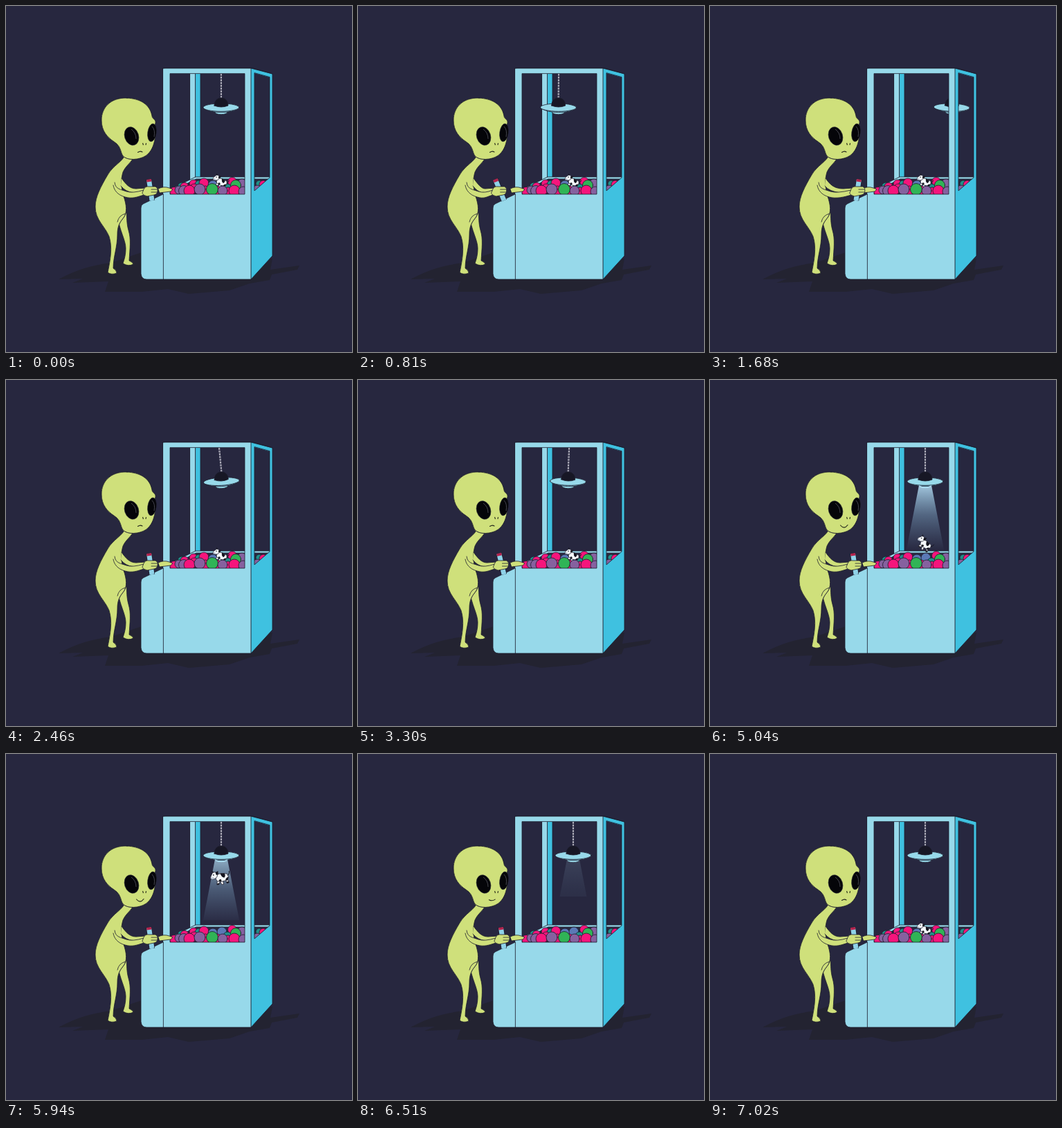
Animation, 500 px wide and 500 px high, one loop 7050 ms. Source, as an HTML page:

```html
<!DOCTYPE html>
<html lang="en">
<head>
<meta charset="utf-8">
<title>Alien claw machine</title>
<style>
html, body { margin: 0; width: 100%; height: 100%; overflow: hidden; background: #27273f; }
svg { display: block; width: 100vw; height: 100vh; }
.ln { stroke: #1c1c2c; stroke-width: .8; stroke-linejoin: round; stroke-linecap: round; }
.skin { fill: #cfe07b; }
.shade { fill: #b5c960; }
.light { fill: #97d9ea; }
.deep { fill: #3fc1e0; }
.none { fill: none; }
</style>
</head>
<body>
<svg viewBox="0 0 500 500">
  <defs>
    <linearGradient id="beamFill" gradientUnits="userSpaceOnUse" x1="0" y1="152" x2="0" y2="248">
      <stop offset="0" stop-color="#b9e4fb" stop-opacity=".85"/>
      <stop offset=".45" stop-color="#8ebcdc" stop-opacity=".42"/>
      <stop offset="1" stop-color="#7ba6ca" stop-opacity="0"/>
    </linearGradient>
    <clipPath id="headClip"><use href="#headShape"/></clipPath>
    <clipPath id="bodyClip"><use href="#bodyShape"/></clipPath>
    <clipPath id="pit"><path d="M237 240H382V249L357 272H237Z"/></clipPath>
  </defs>
  <rect width="500" height="500" fill="#27273f"/>

  <path fill="#232331" d="M76 395Q110 376 152 371L196 356V362L385 365L382 381L424 375L421 381L384 388L381 396L352 401L323 411L264 416L234 409L196 413L143 413L148 398L96 400L111 394Z"/>

  <!-- back of the cabinet -->
  <path class="light ln" d="M266 97H274V248L266 252Z"/>
  <path class="deep ln" d="M274 97H281V248H274Z"/>
  <path class="light ln" d="M237 265L274 247H382V250H275L237 269Z"/>
  <path fill="#29283f" d="M237 269L275 250H382L357 272H237Z"/>
  <g clip-path="url(#pit)">
    <g id="backBalls" class="ln"></g>
    <g id="restCow"></g>
    <g id="frontBalls" class="ln"></g>
  </g>

  <g id="ufo">
    <path id="chain" class="none" stroke="#d4d3dc" stroke-width="2.1" stroke-dasharray="2.8 1.2"/>
    <path id="chainCore" class="none" stroke="#56566b" stroke-width=".6"/>
    <g id="saucer">
      <ellipse class="light ln" cy="6.5" rx="9" ry="3.2"/>
      <path class="ln" fill="#79c3dc" d="M-26 0C-17 9 17 9 26 0Z"/>
      <ellipse class="light ln" cy="-.4" rx="26" ry="5.7"/>
      <path class="ln" fill="#171725" d="M-10 -3C-10 -18 10 -18 10 -3Q0 1 -10 -3Z"/>
    </g>
  </g>
  <path id="beam" fill="url(#beamFill)"/>
  <g id="cow">
    <path class="ln" fill="#fff" d="M-5 4L-6 10H-3L-1 5L1 10H4L3 4L7 3L9 9L12 8L10 2Z"/>
    <path class="ln" fill="#f4f8fb" d="M-6 -5Q1 -7 10 -5Q13 -1 10 4Q2 7 -5 5Q-9 0 -6 -5Z"/>
    <path fill="#15151f" d="M0 -6Q2 1 6 0Q8 -3 6 -6ZM7 4Q8 0 12 0L10 5ZM-3 5Q-2 1 1 3L1 6ZM8 7L9 9L12 8L11 6ZM-6 10L-5 8H-2L-3 10Z"/>
    <path class="none" stroke="#15151f" stroke-width="1" d="M11 -3Q14 -5 13 -9"/>
    <path class="ln" fill="#f4f8fb" d="M-11 -8Q-7 -10 -4 -6Q-4 -1 -8 1L-13 2Q-16 0 -14 -3Z"/>
    <path fill="#15151f" d="M-7 -8L-3 -10L-3 -5L-6 -4ZM-11 -8L-13 -11L-9 -9Z"/>
    <circle cx="-10" cy="-4.5" r=".9" fill="#15151f"/>
    <path fill="#b7c3d4" d="M-14 -1L-10 -1L-9 1L-13 2Z"/>
  </g>

  <!-- cabinet shell -->
  <path class="deep ln" fill-rule="evenodd" d="M354 90L385 98V361L354 395ZM359 97V267L381 248V103Z"/>
  <path class="light ln" fill-rule="evenodd" d="M227 90H354V395H227ZM237 98V272H345V98Z"/>
  <path class="light ln" d="M227 272L198 286Q195 288 195 292V387Q196 395 203 395H227Z"/>
  <path class="none ln" d="M227 90L230 89.5L356 89.5L385 98"/>

  <!-- alien -->
  <path class="skin ln" d="M161 303C164 325 173 338 173 350C173 360 171 366 169 372Q177 377 184 373Q183 370 178 368C179 350 181 337 177 324C174 313 175 305 174 298Z"/>
  <path class="skin ln" id="bodyShape" d="M172 215C169 225 155 230 147 244C137 261 129 276 129 290C129 309 143 318 149 333C154 349 151 366 147 385Q152 389 160 386Q160 382 155 379C155 362 161 349 161 330C161 319 164 313 169 307C176 299 174 287 170 275C166 262 166 250 169 240C173 231 179 228 183 221Z"/>
  <g clip-path="url(#bodyClip)">
    <path class="shade" d="M172 216L120 250V320L150 345L148 376L153 378Q158 345 151 327C135 309 138 288 149 268C158 250 154 235 174 220Z"/>
  </g>
  <use href="#bodyShape" style="fill:none"/>
  <path class="none ln" d="M161 312Q163 302 173 300"/>
  <path class="skin ln" d="M220 264Q228 260 236 263L241 265L238 268L222 270Z"/>
  <path id="farArm" class="skin ln"/>
  <path id="stick" class="none" stroke="#1c1c2c" stroke-width="8.4"/>
  <path id="stickFill" class="none" stroke="#8fd2e8" stroke-width="7"/>
  <path id="knob" class="none" stroke="#b5234d" stroke-width="7"/>
  <path id="nearArm" class="skin ln"/>
  <g id="hand">
    <path class="skin ln" d="M199 265Q201 260 207 261L216 261Q220 263 219 267Q219 272 214 273L204 275Q199 274 197 271Z"/>
    <path class="none ln" d="M210 265H218M210 269H218"/>
  </g>

  <path class="skin ln" id="headShape" d="M175 133C151 132 138 147 138 165C138 181 147 190 156 196C169 204 164 215 172 219C181 224 198 221 205 214C212 207 214 199 216 188C217 180 214 175 216 169C217 164 211 163 211 159C208 142 194 134 175 133Z"/>
  <g clip-path="url(#headClip)">
    <path class="shade" d="M180 128L130 135V190L168 214Q171 205 162 198C146 187 146 177 152 165C158 153 169 160 175 149Q180 138 196 138Z"/>
    <path class="shade" d="M207 158Q210 164 217 164L215 170Q207 168 207 158Z"/>
  </g>
  <use href="#headShape" style="fill:none"/>
  <g fill="#050509" stroke="#1c1c2c" stroke-width=".6">
    <ellipse cx="181.500" cy="188" rx="10" ry="13.500" transform="rotate(-18 181.500 188)"/>
    <ellipse cx="211" cy="183" rx="6.200" ry="13" transform="rotate(8 211 183)"/>
  </g>
  <path class="none" stroke="#55555f" stroke-width=".8" d="M181 178Q188 183 188 192M211 174Q216 179 214 189"/>
  <path class="none" stroke="#34391f" stroke-width="1.200" d="M197.500 198L198.500 201M202.500 198L202 201"/>
  <path id="mouth" class="none" stroke="#22251c" stroke-width="1.100" stroke-linecap="round"/>
</svg>
<script>
const LOOP = 7050;
const $ = id => document.getElementById(id);
const set = (id, attrs) => { for (const k in attrs) $(id).setAttribute(k, attrs[k]); };
const clamp = v => Math.max(0, Math.min(1, v));
const span = (t, a, b) => clamp((t - a) / (b - a));
const ease = u => (1 - Math.cos(Math.PI * u)) / 2;
const mix = (a, b, u) => a + (b - a) * u;

const pink = '#f5157c', purple = '#86619f', green = '#30b456', blue = '#5b79b6', teal = '#218f89';
const balls = (id, list) => {
  $(id).innerHTML = list.map(([x, y, r, c]) =>
    `<circle cx="${x}" cy="${y}" r="${r}" fill="${c}"/>`).join('');
};
balls('backBalls', [
  [254, 261, 6, teal], [258, 261, 6, pink], [271, 257, 6, pink], [279, 258, 6, teal],
  [286, 256, 7, pink], [299, 259, 7, blue], [312, 257, 7, blue],
  [327, 254, 6.5, pink], [320, 263, 6, teal], [341, 257, 7, purple],
  [366, 257, 5, teal], [372, 258, 6, pink], [379, 256, 5, pink]
]);
balls('frontBalls', [
  [332, 259, 7.5, green], [243, 268, 6.5, pink], [250, 266, 6, purple], [257, 267, 7.5, purple],
  [272, 264, 7, pink], [265, 267, 8, pink], [288, 267, 7, pink], [280, 265, 8, purple],
  [305, 267, 7, pink], [298, 265, 8.5, green], [321, 268, 6, pink], [313, 267, 7, purple],
  [330, 267, 8, pink], [343, 268, 7, purple], [363, 265, 6, purple]
]);
const cow = $('cow');
$('restCow').append(cow);

const stops = [[0, 311], [780, 289.5], [1870, 354], [2850, 289.5], [3600, 311]];
function ufoX(t) {
  for (let i = 1; i < stops.length; i++) {
    const [a, from] = stops[i - 1], [b, to] = stops[i];
    if (t < b) return mix(from, to, ease(span(t, a, b)));
  }
  return 311;
}

function drawControls(x) {
  const off = x - 311;
  const tilt = off < 0 ? off * .37 : off * .23;
  const dx = tilt * .55;
  const tipX = 206.5 + tilt, baseX = 211;
  const at = u => `${mix(tipX, baseX, u)} ${mix(251, 281, u)}`;
  set('stick', { d: `M${at(-.02)}L${at(1)}` });
  set('stickFill', { d: `M${at(0)}L${at(1)}` });
  set('knob', { d: `M${at(-.02)}L${at(.1)}` });
  set('hand', { transform: `translate(${dx} 0)` });
  set('farArm', { d: `M167 249C173 257 178 264 ${188 + dx} 264L${202 + dx} 263V269L${184 + dx} 270Q172 268 166 260` });
  set('nearArm', { d: `M157 255C158 265 166 265 174 268Q183 271 ${199 + dx} 266V273C${190 + dx} 276 182 279 172 276C161 273 156 266 155 259` });
}

function drawCow(t) {
  const rise = span(t, 4300, 5850) ** 2;
  const enter = ease(span(t, 5900, 6420));
  const back = span(t, 6680, 6960);
  const resting = t < 4330 || t >= 6600;
  const home = resting ? $('restCow') : $('ufo').parentNode;
  if (cow.parentNode !== home) resting ? home.append(cow) : home.insertBefore(cow, $('beam').nextSibling);
  const y = resting ? 254 : mix(mix(254, 179, rise), 155, enter);
  const turn = resting ? 24 : mix(24, 38, span(t, 4300, 5040)) - 42 * ease(span(t, 5040, 5850));
  const size = resting ? .82 : mix(mix(.82, 1, rise), .05, enter);
  set('cow', {
    transform: `translate(310 ${y}) rotate(${turn}) scale(${size})`,
    opacity: t >= 6600 ? back : t >= 6420 ? 0 : 1
  });
}

function draw(t) {
  const x = ufoX(t);
  const sway = (ufoX(Math.min(t + 30, 3600)) - x) * 1.2;
  const chain = `M${x + sway} 98L${x} 134`;
  set('chain', { d: chain });
  set('chainCore', { d: chain });
  set('saucer', { transform: `translate(${x} 147) rotate(${sway})` });
  drawControls(x);

  const power = ease(span(t, 3700, 4320)) * (1 - span(t, 5790, 6660));
  const reach = ease(span(t, 3660, 4320)) * mix(1, .55, span(t, 5790, 6480));
  const low = mix(152, 250, reach), half = mix(9, 28, reach);
  set('beam', { d: `M302 152Q311 157 320 152L${311 + half} ${low}H${311 - half}Z`, opacity: power });
  drawCow(t);

  const smile = ease(span(t, 3630, 3960)) * (1 - ease(span(t, 6330, 6720)));
  set('mouth', {
    d: `M${mix(190.5, 188.5, smile)} ${mix(211.5, 210, smile)}Q${mix(194, 194, smile)} ${mix(209, 216.5, smile)} ${mix(197, 199, smile)} ${mix(211, 209.5, smile)}`
  });
}

const start = performance.now();
function tick() {
  draw((performance.now() - start) % LOOP);
  requestAnimationFrame(tick);
}
draw(0);
requestAnimationFrame(tick);
</script>
</body>
</html>
```
